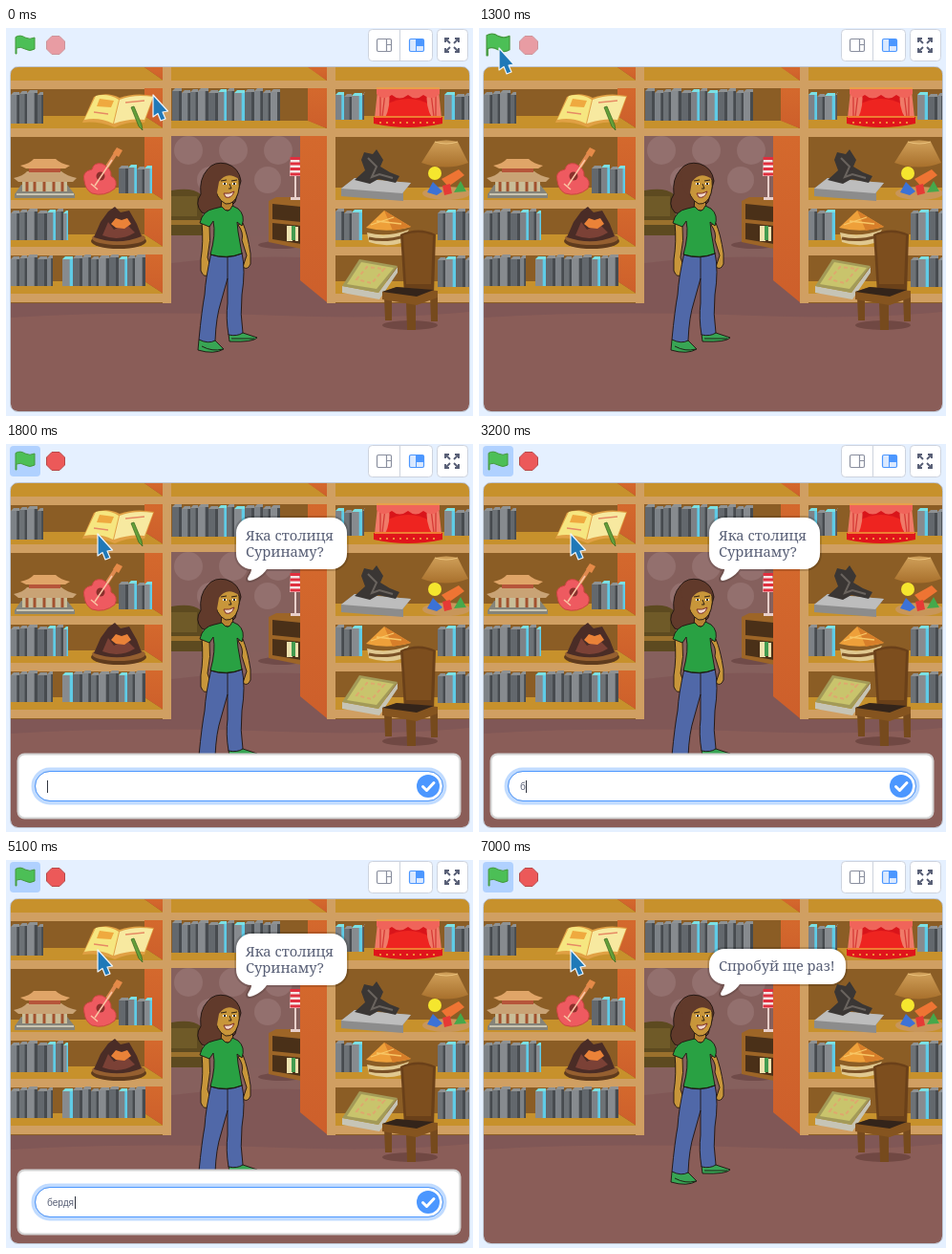
An HTML page for the animation above (8000 ms loop, 489x406 px).

```html
<!DOCTYPE html>
<html lang="uk">
<head>
<meta charset="utf-8">
<title>Quiz in the library</title>
<style>
html, body { margin: 0; width: 100%; height: 100%; overflow: hidden; background: #e5f0ff; }
svg { display: block; width: 489px; height: 406px; }
.say { font: 14.7px "Noto Serif", serif; fill: #575e75; }
#typed { font: 10.15px "Liberation Sans", Arial, sans-serif; fill: #575e75; }
</style>
</head>
<body>
<svg viewBox="0 0 489 406">
  <defs>
    <clipPath id="stageClip"><rect x="5" y="41" width="480" height="360" rx="7"/></clipPath>
    <linearGradient id="side" x2="0" y2="1"><stop stop-color="#d4692d"/><stop offset="1" stop-color="#cd5f2b"/></linearGradient>
    <linearGradient id="skirt" x2="0" y2="1"><stop stop-color="#d0a05a"/><stop offset="1" stop-color="#a8702c"/></linearGradient>
  </defs>
  <rect width="489" height="406" fill="#e5f0ff"/>

  <!-- toolbar -->
  <rect id="flagGlow" x="4" y="2" width="32" height="32" rx="4" fill="#4c97ff" fill-opacity=".35"/>
  <g id="flag">
    <path d="M10 27V9.500Q15 6.500 20 10Q25 12.500 30 10V22Q25 25 20 22Q15 19 11 21V27Z" fill="#4cbf56" stroke="#45993d" stroke-linejoin="round"/>
  </g>
  <path id="stop" d="M48 8.500H56L61.500 14V22L56 27.500H48L42.500 22V14Z" fill="#ec5959" stroke="#b84848"/>
  <g fill="#fff" stroke="#cdd3de">
    <rect x="379.500" y="1.500" width="67" height="33" rx="4"/>
    <rect x="451.500" y="1.500" width="32" height="33" rx="4"/>
    <path d="M412.500 2V34"/>
  </g>
  <g fill="none" stroke="#8a8f9f" stroke-width="1.200">
    <rect x="388.500" y="11.500" width="15" height="13" rx="1.500"/>
    <path d="M398.500 11.500V24.500M398.500 17.500H403.500"/>
  </g>
  <rect x="422.500" y="11.500" width="15" height="13" rx="1.500" fill="#dbe9ff" stroke="#4c97ff" stroke-width="1.200"/>
  <path d="M429 12H437V19H429Z" fill="#4c97ff"/>
  <path d="M429.500 12V24" stroke="#4c97ff"/>
  <g id="expand" fill="none" stroke="#575e75" stroke-width="1.900"></g>

  <!-- stage -->
  <g clip-path="url(#stageClip)">
    <rect x="4" y="40" width="482" height="362" fill="#8a5d58"/>
    <path d="M5 286H173V216H310L345 286H486V297Q400 306 260 300Q120 296 5 303Z" fill="#805756"/>
    <rect x="173" y="113" width="136" height="107" fill="#85605d"/>
    <g id="wallDots" fill="#93706e"></g>
    <path d="M173 218H309V240Q240 238 173 246Z" fill="#86605d"/>

    <!-- back room furniture -->
    <path d="M173 170Q195 166 204 174L206 197H209V217H173Z" fill="#5d4a20"/>
    <path d="M173 176H200V197H173Z" fill="#6f5a28"/>
    <path d="M173 201H209V206H173Z" fill="#9a712d"/>
    <ellipse cx="288" cy="227" rx="24" ry="4" fill="#704b49"/>
    <path d="M275 181L283 177H309V231L275 224Z" fill="#9d6527"/>
    <path d="M279 184L309 187V203L279 200ZM279 204L309 207V226L279 221Z" fill="#4a3018"/>
    <path d="M294 207H300V223H294ZM303 208H306V223H303Z" fill="#eee3b0"/>
    <path d="M299 207H303V222H299Z" fill="#439b50"/>
    <path d="M302 154H304V178H302ZM298 177H308V180H298Z" fill="#e8cfca"/>
    <path d="M298 135H307L309 155H297Z" fill="#f6e4e4"/>
    <path d="M303 135V155" stroke="#e0303f" stroke-width="11" stroke-dasharray="3 2.500"/>

    <g id="shelves"></g>

    <!-- open book and pencil -->
    <path d="M80 99L92 72Q105 66 119 73Q135 67 155 71L145 99Q130 97 114 104Q96 97 80 99Z" fill="#e0a044"/>
    <path d="M82 96L94 71Q107 68 118 75L112 100Q98 93 82 96Z" fill="#f6e680"/>
    <path d="M113 100L119 75Q134 69 154 72L145 96Q130 94 113 100Z" fill="#f7e9a0"/>
    <path d="M98 74L113 76L110 83L95 82Z" fill="#efa93f"/>
    <path d="M125 78L145 76M92 88L107 90" stroke="#e68a64" stroke-width="1.300"/>
    <path d="M131 83L134 82L142 101L143 107L139 103Z" fill="#64a03a" stroke="#35651f" stroke-width=".7"/>

    <!-- pagoda -->
    <path d="M9 174L16 164H64L72 174V178H9Z" fill="#85847a"/>
    <path d="M17 159H64V171H17Z" fill="#c9bd98"/>
    <path d="M22 159V171M30 159V171M40 159V171M50 159V171M59 159V171" stroke="#a2522f" stroke-width="3"/>
    <path d="M8 157Q18 155 22 150H58Q64 155 74 157L70 161H13Z" fill="#c9a375"/>
    <path d="M24 145H57V151H24Z" fill="#b6553a"/>
    <path d="M15 144Q25 142 29 137H52Q57 142 67 144L62 147H21Z" fill="#e0a568"/>
    <path d="M11 174H71" stroke="#c9c4b0" stroke-width="2"/>

    <!-- guitar -->
    <path d="M102 151L115 131" stroke="#e08a50" stroke-width="4"/>
    <path d="M112 131L116 125L122 128L118 135Z" fill="#e58a48"/>
    <path d="M82 160Q79 150 90 148Q92 140 101 142Q111 147 110 155Q118 159 114 168Q103 177 90 173Q83 169 82 160Z" fill="#ee5a60" stroke="#c9463f"/>
    <circle cx="99" cy="155" r="4.500" fill="#8a302c"/>
    <path d="M89 163L96 169M93 165L111 138" stroke="#fac5a4" stroke-width="1.500"/>

    <!-- cake -->
    <ellipse cx="118" cy="223" rx="29" ry="8" fill="#5f3b1d"/>
    <ellipse cx="118" cy="220" rx="28" ry="7" fill="#955f30"/>
    <path d="M92 219L99 203L107 192L114 187L120 193L129 191L137 205L142 218Q118 228 92 219Z" fill="#4a2c26"/>
    <path d="M101 217L107 203L113 211L119 208L128 207L135 214Q119 224 101 217Z" fill="#7b4136"/>
    <path d="M110 205L115 199L121 201L127 199L131 205L124 210L115 209Z" fill="#ea8238"/>

    <!-- theatre -->
    <path d="M387 92L391 63H451L455 92Z" fill="#d9141a"/>
    <path d="M398 80Q421 68 444 80V92H398Z" fill="#ee2420"/>
    <path d="M389 66H401Q403 82 397 94H386ZM453 66H441Q439 82 446 94H456Z" fill="#f07a68"/>
    <path d="M392 68V93M397 68L394 93M450 68V93M445 68L448 93" stroke="#d63a36" stroke-width="1.300"/>
    <path d="M388 63H454V69Q446 77 437 70Q429 77 421 70Q412 77 404 70Q395 77 388 69Z" fill="#f0645a"/>
    <path d="M388 63H454" stroke="#e8a04a" stroke-width="2"/>
    <path d="M385 93H457V100Q421 108 385 100Z" fill="#e0141b"/>
    <path d="M386 93H456" stroke="#ef7d32" stroke-width="2"/>
    <path d="M391 99H451" stroke="#f6b442" stroke-width="1.500" stroke-dasharray="2 5"/>

    <!-- dark figure on a slab -->
    <path d="M351 168L365 157L424 162L416 172V181L351 176Z" fill="#8c8c8c"/>
    <path d="M351 168L365 157L424 162L415 173Z" fill="#bdbdbd"/>
    <path d="M365 159L376 149L372 138L375 130L384 132L388 127L395 138L392 145L402 151L412 155L408 162L390 158L381 163Z" fill="#3a3634"/>
    <path d="M379 136L388 145L383 156L391 153L405 157" fill="none" stroke="#69635e" stroke-width="2"/>

    <!-- table with toys -->
    <ellipse cx="461" cy="173" rx="25" ry="7" fill="#c8965a"/>
    <path d="M449 119Q461 116 473 119L484 141Q461 150 435 141Z" fill="url(#skirt)"/>
    <path d="M449 119Q461 123 473 119" stroke="#ecc47d" fill="none"/>
    <circle cx="449" cy="152" r="7" fill="#f5e62e"/>
    <path d="M456 158L474 148L480 154L463 166Z" fill="#ee7433"/>
    <path d="M441 172L447 161L457 171L451 175Z" fill="#3c72d6"/>
    <path d="M457 165L465 163L467 173L459 175Z" fill="#e63a35"/>
    <path d="M469 172L476 160L482 171Z" fill="#45a84b"/>

    <!-- junk boat -->
    <path d="M378 214Q399 220 422 211L414 225Q397 230 380 224Z" fill="#e0c890"/>
    <path d="M380 220Q397 224 417 218" stroke="#795026" stroke-width="3" fill="none"/>
    <path d="M377 209L396 191L424 208Q400 215 377 209Z" fill="#eea03a"/>
    <path d="M396 191L424 208L405 212Z" fill="#d87f2a"/>
    <path d="M382 206L406 198M388 202L414 205" stroke="#f8c766" stroke-width="1.300"/>

    <!-- map book -->
    <path d="M352 270L390 277L410 250V256L391 284L352 277Z" fill="#c6c4b6"/>
    <path d="M352 270L370 242L410 249L390 277Z" fill="#a39a58"/>
    <path d="M357 268L372 245L406 251L388 273Z" fill="#c9c46c"/>
    <path d="M367 263L378 250L396 252L383 267Z" fill="none" stroke="#dfa86e" stroke-width="2" stroke-dasharray="4 3"/>

    <!-- chair -->
    <ellipse cx="423" cy="311" rx="29" ry="5" fill="#704843"/>
    <path d="M413 216Q432 207 450 216L448 278H417Z" fill="#6a4019"/>
    <path d="M416 217Q432 211 447 217L445 268H419Z" fill="#7d4e1e"/>
    <path d="M396 281H404V306H397ZM444 278H452V307H445ZM419 287H429V316H420Z" fill="#764a1d"/>
    <path d="M394 276L409 271L452 275V282L430 290L394 284Z" fill="#85541f"/>
    <path d="M394 276L409 271L448 274L430 281Z" fill="#33241a"/>

    <!-- girl -->
    <g stroke="#1d1410" stroke-width=".9" stroke-linejoin="round">
      <path d="M211 148Q218 139 231 142Q244 146 246 160L240 182Q232 192 222 189Q215 199 205 193Q197 184 204 174Q202 158 211 148Z" fill="#613a2b"/>
      <path d="M205 203Q207 224 204 242L204 254Q207 262 212 258L213 246L211 240Q215 222 213 206ZM243 206Q249 214 247 222L252 238L248 250Q253 254 256 247L256 236Q253 216 248 204Z" fill="#c8963a"/>
      <path d="M202 326Q211 323 219 327L228 336Q218 342 201 337ZM233 320Q241 315 248 319L263 324Q259 329 234 328Z" fill="#38a554"/>
      <path d="M215 235Q209 261 208 279Q205 295 202 326Q212 331 219 327Q220 302 225 287L232 262L232 288Q230 303 233 321Q242 323 248 319Q245 300 247 279Q251 254 247 235Z" fill="#5068a8"/>
      <path d="M226 176L225 191L238 191L237 176Z" fill="#b88432"/>
      <path d="M218 189Q206 191 203 204L213 208L217 202Q220 216 214 237Q231 243 247 236L243 213L242 203L247 207Q251 196 243 189L237 186Q233 196 226 187Z" fill="#29a143"/>
      <path d="M218 159Q224 148 239 150Q247 157 243 173Q239 185 230 184Q219 179 218 159Z" fill="#c8963a"/>
      <path d="M211 148Q222 139 235 145Q244 149 244 158Q231 149 223 161L220 178Q211 168 211 148Z" fill="#613a2b" stroke="none"/>
    </g>
    <path d="M225 160L231 159M236 160L242 159M234 163L236 168H233M214 237Q231 242 247 236M232 240V262M205 333Q216 339 227 336M236 325H260" fill="none" stroke="#1d1410" stroke-width=".9"/>
    <path d="M227 163H231M237 163H241" stroke="#fff" stroke-width="1.800"/>
    <path d="M228 163H230M238 163H240" stroke="#23150f" stroke-width="2"/>
    <path d="M228 173Q234 174 239 171Q236 179 230 177Z" fill="#f3d9cc" stroke="#7c2c26" stroke-width="1"/>

    <g id="bubble">
      <path id="bubbleShape" fill="#fff" stroke="#000" stroke-opacity=".15" stroke-width="4" paint-order="stroke"/>
      <text id="line1" class="say" x="251"></text>
      <text id="line2" class="say" x="251" y="118"></text>
    </g>
  </g>
  <rect x="4.500" y="40.500" width="481" height="361" rx="8" fill="none" stroke="#bfc6d2"/>

  <g id="ask">
    <rect x="12.500" y="324.500" width="463" height="67" rx="7" fill="#fff" stroke="#d2d2d2" stroke-width="2"/>
    <rect x="30.500" y="342.500" width="427" height="31" rx="15.500" fill="#fff" stroke="#d9d9d9"/>
    <g id="focus" fill="none" stroke="#4c97ff">
      <rect x="28.500" y="340.500" width="431" height="35" rx="17.500" stroke-width="4" stroke-opacity=".35"/>
      <rect x="30.500" y="342.500" width="427" height="31" rx="15.500"/>
    </g>
    <circle cx="442" cy="358" r="12" fill="#4c97ff"/>
    <path d="M436.500 358.500L440.500 362.500L448 354.500" fill="none" stroke="#fff" stroke-width="3" stroke-linecap="round" stroke-linejoin="round"/>
    <text id="typed" x="43" y="362"></text>
    <rect id="caret" y="352" width="1" height="13" fill="#30343f"/>
  </g>

  <g id="cursor" fill="#2079b8" stroke="#eef5fb" stroke-width="1.200" stroke-linejoin="round">
    <path id="arrow" d="M0 0V23L5 19.500L8 27L13 25L10 18L15.500 17Z"/>
    <g id="hand">
      <path d="M-2 1Q0 -1 2 1L4 9Q7 7 8 10Q11 8 12 11Q14 10 14 14L14 20L12 25H2L-2 20L-8 14Q-6 11 -1 14Z"/>
      <path d="M4 9L5 14M8 10L9 15M12 11L12 15" fill="none" stroke="#174f7d" stroke-width="1"/>
    </g>
  </g>
</svg>
<script>
const $ = id => document.getElementById(id);
const NS = "http://www.w3.org/2000/svg";

function add(parent, tag, attrs) {
  const el = document.createElementNS(NS, tag);
  for (const key in attrs) el.setAttribute(key, attrs[key]);
  parent.appendChild(el);
}
const shape = (d, fill) => add($("shelves"), "path", { d, fill });
const box = (x, y, w, h, fill) => shape(`M${x} ${y}h${w}v${h}h${-w}Z`, fill);

const WOOD = "#d09f62", TOP = "#c7912c", BACK = "#8b5d25";
const GREYS = ["#6d7276", "#7d8287", "#63686d", "#878b8f"];

// Each book shows a grey spine, a darker edge and a slanted top.
function books(from, to, top, bottom, accents = []) {
  let i = 0;
  for (let x = from; x < to; i++) {
    const w = Math.min(8 + (i * 3 + from) % 4, to - x);
    const y = top + (i * 2 + from) % 3;
    const bright = accents.some(a => a >= x && a < x + w);
    box(x, y, w, bottom - y, GREYS[(i * 3 + from) % 4]);
    box(x + w * 0.7, y, w * 0.3, bottom - y, bright ? "#5fcbe6" : "#474b4f");
    shape(`M${x} ${y}l3 -3h${w - 3}v3Z`, bright ? "#7be0e4" : "#8f9293");
    x += w;
  }
}

function bookcase() {
  const rows = [[41, 55], [63, 105], [114, 180], [189, 229], [237, 278]];
  box(5, 41, 160, 247, BACK);
  box(173, 41, 163, 72, BACK);
  box(345, 41, 141, 247, BACK);
  rows.forEach(([top, y], i) => {
    const depth = i ? 13 : 14;
    shape(`M5 ${y - depth}H145L165 ${y}H5Z`, TOP);
    shape(`M145 ${top}H165V${y}L145 ${y - depth}Z`, "url(#side)");
    box(345, y - depth, 141, depth, TOP);
    box(5, y, 160, 9, WOOD);
    box(345, y, 141, 9, WOOD);
    if (i < 2) {
      shape(`M173 ${y - (i ? 8 : 14)}H317L336 ${y}H173Z`, TOP);
      shape(`M316 ${top}H336V${y}L316 ${y - (i ? 8 : 14)}Z`, "url(#side)");
      box(173, y, 163, 8, WOOD);
    }
  });
  shape("M308 113H336V287L308 264Z", "url(#side)");
  box(164, 41, 9, 247, WOOD);
  box(336, 41, 9, 247, WOOD);

  books(5, 39, 68, 100);
  books(174, 287, 66, 97, [224, 240]);
  books(118, 153, 146, 173, [136, 148]);
  books(5, 65, 192, 222, [46, 60]);
  books(5, 49, 240, 270);
  books(59, 146, 240, 270, [64, 126]);
  books(345, 375, 70, 96, [350, 368]);
  books(459, 486, 70, 96, [464]);
  books(345, 373, 192, 222, [364]);
  books(452, 486, 192, 222, [460]);
  books(452, 486, 241, 271, [464]);
}

function decorate() {
  for (let i = 0; i < 3; i++) {
    add($("wallDots"), "circle", { cx: 191 + i * 47, cy: 128, r: 15 });
    if (i) add($("wallDots"), "circle", { cx: 214 + (i - 1) * 60, cy: 159, r: 14 });
  }
  for (const sx of [-1, 1]) for (const sy of [-1, 1])
    add($("expand"), "path", {
      d: "M2 2L7 7M3 7H7V3", transform: `translate(467 18) scale(${sx} ${sy})`
    });
}

// Rounded speech balloon with the tail at its lower left corner.
function balloon(x, y, right, bottom) {
  const r = 16;
  return `M${x + r} ${bottom}c0 4 -4 8 -4 10q0 2 2 2c3 0 13 -4 18 -12` +
    `H${right - r}a${r} ${r} 0 0 0 ${r} ${-r}V${y + r}a${r} ${r} 0 0 0 ${-r} ${-r}` +
    `H${x + r}a${r} ${r} 0 0 0 ${-r} ${r}V${bottom - r}a${r} ${r} 0 0 0 ${r} ${r}Z`;
}

const LOOP = 8000, ASK = 1400, SAY = 1500, ANSWERED = 7000;
const ANSWER = "бердянськ";
const KEYS = [3200, 3500, 3600, 4100, 5100, 5400, 5800, 5900, 6100];
const CARET_OFF = [[2500, 3200], [3800, 4100], [4900, 5100]];
const POINTER = [
  [0, 154, 70], [500, 161, 81], [600, 120, 72], [700, 69, 54],
  [900, 28, 26, true], [1000, 21, 20, true], [1300, 21, 21],
  [1600, 44, 46], [1700, 80, 80], [1800, 96, 94]
];

const ramp = (t, from, to) => Math.min(1, Math.max(0, (t - from) / (to - from)));
const show = (id, on) => $(id).setAttribute("visibility", on ? "inherit" : "hidden");
const fade = (id, opacity) => $(id).setAttribute("opacity", opacity);

function draw(now) {
  const t = Math.floor((now % LOOP) / 100) * 100;

  const [, x, y, hand] = POINTER.filter(p => p[0] <= t).pop();
  $("cursor").setAttribute("transform", `translate(${x} ${y})`);
  show("hand", hand);
  show("arrow", !hand);

  const size = 1 + 0.2 * (ramp(t, 900, 1100) - ramp(t, 1600, 1800));
  $("flag").setAttribute("transform", `translate(20 18) scale(${size}) translate(-20 -18)`);
  fade("flagGlow", ramp(t, ASK, 1700));
  fade("stop", t < ASK ? 0.55 : 1);

  const done = t >= ANSWERED;
  show("bubble", t >= SAY);
  $("bubbleShape").setAttribute("d", done ? balloon(241, 93, 384, 130) : balloon(241, 77, 357, 131));
  $("line1").textContent = done ? "Спробуй ще раз!" : "Яка столиця";
  $("line1").setAttribute("y", done ? 116 : 101);
  $("line2").textContent = done ? "" : "Суринаму?";

  show("ask", t >= ASK && !done);
  fade("focus", ramp(t, ASK, 1800));
  const typed = ANSWER.slice(0, KEYS.filter(k => k <= t).length);
  $("typed").textContent = typed;
  const width = typed ? $("typed").getComputedTextLength() : 0;
  $("caret").setAttribute("x", 43 + Math.ceil(width));
  fade("caret", CARET_OFF.some(([a, b]) => t >= a && t < b) ? 0 : 1);
}

bookcase();
decorate();
const start = performance.now();
function tick() {
  draw(performance.now() - start);
  requestAnimationFrame(tick);
}
tick();
</script>
</body>
</html>
```
